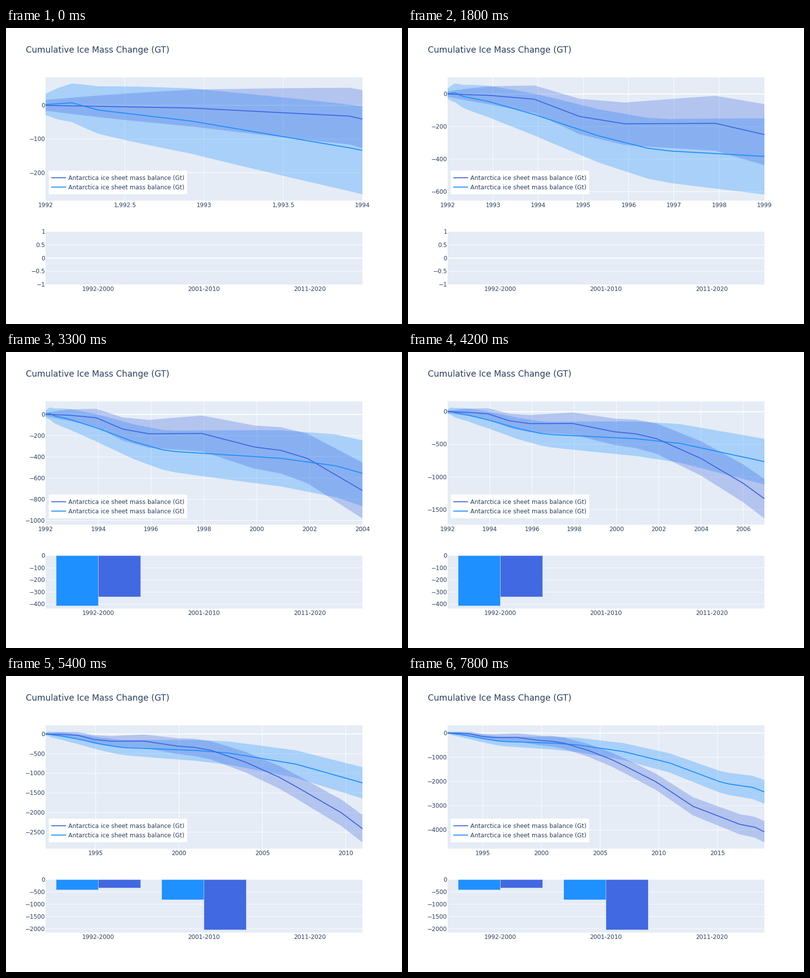
A matplotlib script that plays this animation: 800 px wide and 600 px high, repeating every 8 s.

```python
import math

import matplotlib.pyplot as plt
import numpy as np
from matplotlib.animation import FuncAnimation
from matplotlib.patches import Polygon, Rectangle

WIDTH, HEIGHT, DPI = 800, 600, 100
INTERVAL, FRAMES, STEP = 100, 80, 300
PX = 72 / DPI

INK, PANEL = "#2a3f5f", "#e5ecf6"
DODGER, ROYAL = "#1e90ff", "#4169e1"

LEFT, RIGHT = 80, 720
TOP_PLOT = (100, 349.9)
BAR_PLOT = (412.9, 520)
START = 1992
PERIODS = [(1992, 2000), (2001, 2010), (2011, 2020)]

plt.rcParams.update({"font.family": "DejaVu Sans", "path.snap": False})

# Turning points of the cumulative mass: (years since START, Gt).
DODGER_TURNS = [
    (0, 2.5), (0.167, 7.5), (0.333, -14), (0.917, -46.5), (1.917, -126),
    (3.333, -257), (4.417, -333), (4.917, -350), (8.917, -414), (11, -485),
    (15, -765), (18.917, -1233), (23.167, -2005), (24, -2103), (26, -2244),
    (27, -2428),
]
ROYAL_TURNS = [
    (0, 0), (0.917, -8), (1.917, -32), (2.917, -138), (3.917, -183),
    (5.917, -180), (7.917, -308), (8.917, -339), (9.917, -415), (12, -717),
    (14, -1098), (15, -1333), (17.75, -2009), (20.917, -3025),
    (24.917, -3770), (26.2, -3888), (27, -4078),
]


def dodger_band(t):
    return np.sqrt(1000 + 2000 * (1 - np.exp(-5 * t)) + 6900 * t + 70 * t**2)


def royal_band(t):
    return np.sqrt(272 + 3000 * t**1.262)


SERIES = [(DODGER_TURNS, dodger_band, DODGER), (ROYAL_TURNS, royal_band, ROYAL)]

fig = plt.figure(figsize=(WIDTH / DPI, HEIGHT / DPI), dpi=DPI, facecolor="white")
ax = fig.add_axes([0, 0, 1, 1])


def mass(turns, t):
    return np.interp(t, *zip(*turns), left=0)


def scale(lo, hi, start, end):
    return lambda v: start + (v - lo) / (hi - lo) * (end - start)


def ticks(lo, hi, length, min_gap):
    """Round tick values with a spacing of 2, 5 or 10 times a power of ten."""
    rough = (hi - lo) / (min(max(length / min_gap, 4), 9) + 1)
    base = 10 ** math.floor(math.log10(rough))
    step = next(m for m in (2, 5, 10) if m > rough / base) * base
    first, last = math.ceil(lo / step - 1e-6), math.floor(hi / step + 1e-6)
    return [k * step for k in range(first, last + 1)]


# Lines and patches share one zorder, so they stack in drawing order.
def line(xs, ys, color, width):
    ax.plot(xs, ys, color=color, lw=width * PX, solid_capstyle="butt",
            solid_joinstyle="miter", zorder=1)


def box(x0, y0, x1, y1, color, edge="none", width=0):
    ax.add_patch(Rectangle((x0, y0), x1 - x0, y1 - y0, fc=color, ec=edge,
                           lw=width * PX, zorder=1))


def text(x, y, label, size=12, ha="left"):
    ax.text(x, y, label, fontsize=size * PX, color=INK, ha=ha, va="baseline")


def y_axis(lo, hi, top, bottom):
    """Draw horizontal grid and labels; return the value-to-pixel map."""
    to_y = scale(lo, hi, bottom, top)
    for v in ticks(lo, hi, bottom - top, 40):
        y = to_y(v)
        if top + 1 < y < bottom - 1:
            line([LEFT, RIGHT], [y, y], "white", 1 if v else 2)
        text(79, y + 4.2, f"{v:g}".replace("-", "\u2212"), ha="right")
    return to_y


def year_axis(end, top, bottom):
    to_x = scale(START, end, LEFT, RIGHT)
    for v in ticks(START, end, RIGHT - LEFT, 80):
        x = to_x(v)
        if LEFT + 1 < x < RIGHT - 1:
            line([x, x], [top, bottom], "white", 1)
        label = f"{v:.0f}" if v == int(v) else f"{v:,.1f}"
        text(x, bottom + 13, label, ha="center")
    return to_x


def draw_curves(end):
    top, bottom = TOP_PLOT
    box(LEFT, top, RIGHT, bottom, PANEL)
    t = np.linspace(0, end - START, 12 * (end - START) + 1)
    curves = []
    for turns, band, color in SERIES:
        mid, half = mass(turns, t), band(t)
        curves.append((mid, mid + half, mid - half, color))
    high = max(c[1].max() for c in curves)
    low = min(c[2].min() for c in curves)
    pad = (high - low) / 18

    xs = year_axis(end, top, bottom)(START + t)
    to_y = y_axis(low - pad, high + pad, top, bottom)
    for _, upper, lower, color in curves:
        outline = np.column_stack([np.r_[xs, xs[::-1]],
                                   to_y(np.r_[upper, lower[::-1]])])
        ax.add_patch(Polygon(outline, fc=color, ec="none", lw=0, alpha=0.3,
                             zorder=1))
    for mid, _, _, color in curves:
        line(xs, to_y(mid), color, 2)


def draw_bars(end):
    top, bottom = BAR_PLOT
    box(LEFT, top, RIGHT, bottom, PANEL)
    # A period's change runs from December to December.
    totals = [[mass(turns, last + 11 / 12 - START)
               - mass(turns, first - 1 / 12 - START) for turns, _, _ in SERIES]
              for first, last in PERIODS if end > last]
    lo, hi = (np.min(totals) / 0.95, 0) if totals else (-1, 1)
    to_y = y_axis(lo, hi, top, bottom)
    slot = (RIGHT - LEFT) / len(PERIODS)
    width = 0.4 * slot
    for i, (first, last) in enumerate(PERIODS):
        center = LEFT + (i + 0.5) * slot
        text(center, bottom + 13, f"{first}-{last}", ha="center")
        if i < len(totals):
            for x, v, color in zip((center - width, center), totals[i],
                                   (DODGER, ROYAL)):
                box(x, to_y(0), x + width, to_y(v), color, PANEL, 0.5)


def draw_legend():
    box(86.4, 289, 366, 337, "white")
    for y, color in ((303.5, ROYAL), (322.5, DODGER)):
        line([91.4, 121.4], [y, y], color, 2)
        text(126.4, y + 4.6, "Antarctica ice sheet mass balance (Gt)")


def update(frame):
    ax.clear()
    ax.set(xlim=(0, WIDTH), ylim=(HEIGHT, 0))
    ax.axis("off")
    end = max(1994, 1993 + frame * INTERVAL // STEP)
    text(40, 50, "Cumulative Ice Mass Change (GT)", 17.1)
    draw_curves(end)
    draw_bars(end)
    draw_legend()
    return []


anim = FuncAnimation(fig, update, frames=FRAMES, init_func=lambda: [],
                     interval=INTERVAL, repeat=True, repeat_delay=0)
plt.show()
```
